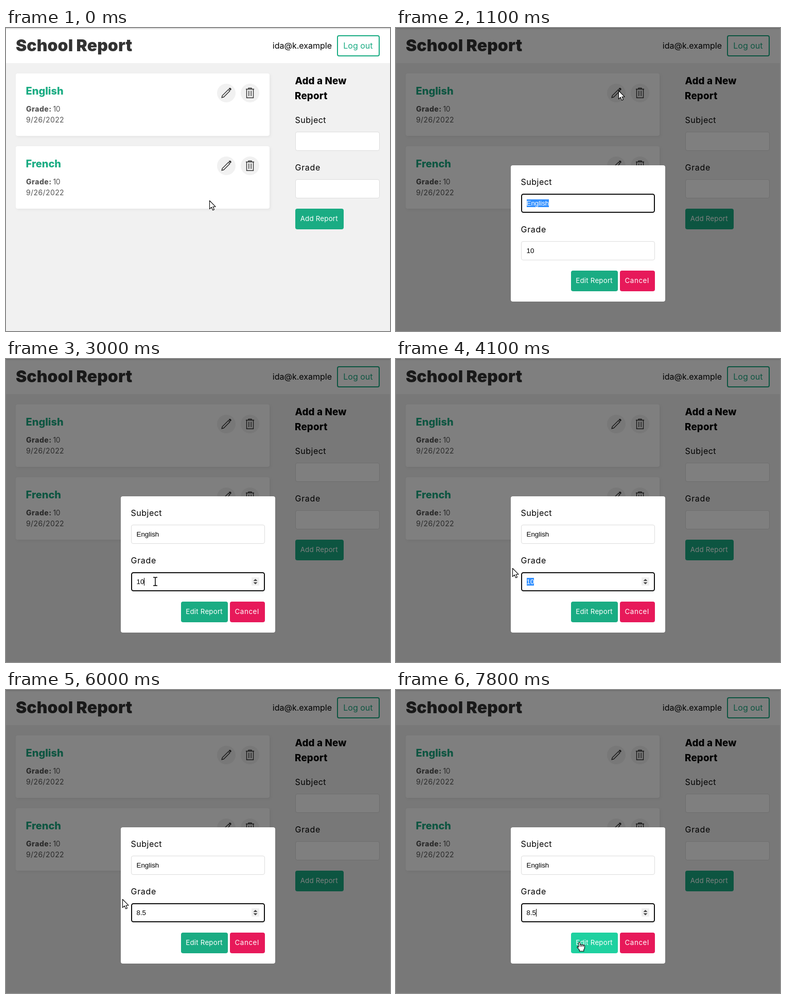
An HTML page for the animation above (8000 ms loop, 746 by 587 pixels).

```html
<!DOCTYPE html>
<html lang="en">
<head>
<meta charset="utf-8">
<title>School Report</title>
<style>
  html, body { margin: 0; width: 100%; height: 100%; overflow: hidden; background: #f1f1f1; }
  svg { display: block; }
  text { font: 16px Inter, "Open Sans", sans-serif; fill: #000; white-space: pre; }
  .h1 { font-size: 32px; font-weight: 900; fill: #333; letter-spacing: .05px; }
  .h3 { font-size: 18.72px; font-weight: 800; letter-spacing: .2px; }
  .h4 { font-size: 20px; font-weight: 800; fill: #1aac83; }
  .meta { font-size: 14px; fill: #555; letter-spacing: .4px; }
  .strong { font-weight: 800; letter-spacing: .5px; }
  .tight { letter-spacing: -.4px; }
  .label { letter-spacing: .5px; }
  .wide { letter-spacing: .7px; }
  .link { fill: #1aac83; }
  .btn { font-size: 13.33px; fill: #fff; letter-spacing: .2px; }
  .loose { letter-spacing: .6px; }
  .value { font: 13.33px "Liberation Sans", Arial, sans-serif; }
  .card { fill: #fff; filter: drop-shadow(2px 2px 2.5px rgba(0, 0, 0, .05)); }
  .disc { fill: #f1f1f1; }
  .disc.hover { fill: #b4b2b2; }
  .field { fill: #fff; stroke: #ddd; }
  .field.focus { stroke: #101010; stroke-width: 2px; }
  .green { fill: #1aac83; }
  .green.hover { fill: #1fd1a0; }
  .red { fill: #e7195a; }
  .mark { fill: #3390ff; }
  .line { fill: none; stroke: #333; stroke-width: 1.4px; }
  .pointer { fill: #fff; stroke: #000; stroke-width: 1.1px; stroke-linejoin: round; }
</style>
</head>
<body>
<svg width="746" height="587" viewBox="0 0 746 587">
  <defs>
    <linearGradient id="edge" x2="0" y2="1">
      <stop stop-color="#cfcfcf"/><stop offset="1" stop-color="#fff"/>
    </linearGradient>
    <g id="pencil">
      <path class="line" d="M-8.8 8.8 -7.8 5 4-6.8 6.8-4-5 7.8Z"/>
      <path fill="#333" d="M4.6-8.4 6-9.8Q7-10.6 8-9.8L9.4-8.4Q10.2-7.4 9.4-6.4L8-5Z"/>
    </g>
    <g id="bin" class="line">
      <path d="M-8-7.5H8M-3-8V-9.5H3V-8M-6.5-7.5V9.3H6.5V-7.5M-2.2-4.5V6M2.2-4.5V6"/>
    </g>
    <g id="card">
      <rect class="card" x="19" y="88" width="493" height="121" rx="4"/>
      <text class="meta strong" x="39" y="162">Grade:</text>
      <text class="meta tight" x="91.5" y="162">10</text>
      <text class="meta" x="39" y="183">9/26/2022</text>
      <circle class="disc" cx="474" cy="126" r="18"/>
      <use href="#bin" x="474" y="126"/>
    </g>
    <path id="ibeam" d="M-4-8H-1.5Q0-8 0-6.5 0-8 1.5-8H4M0-7V7M-4 8H-1.5Q0 8 0 6.5 0 8 1.5 8H4"/>
  </defs>

  <rect width="746" height="587" fill="#f1f1f1"/>
  <rect width="746" height="68" fill="#fff"/>
  <rect width="746" height="3" fill="url(#edge)"/>
  <text class="h1" x="19" y="45">School Report</text>
  <text x="633" y="40" text-anchor="end">ida@k.example</text>
  <rect x="644" y="15" width="81" height="39" rx="3" fill="#fff" stroke="#1aac83" stroke-width="2"/>
  <text class="link" x="655.3" y="40">Log out</text>

  <use href="#card"/>
  <text class="h4" x="38.5" y="129">English</text>
  <circle class="disc edit" cx="428" cy="126" r="18"/>
  <use href="#pencil" x="428" y="126"/>

  <use href="#card" y="141"/>
  <text class="h4" x="38.5" y="270">French</text>
  <circle class="disc edit" cx="428" cy="267" r="18"/>
  <use href="#pencil" x="428" y="267"/>

  <text class="h3" x="561.5" y="109">Add a New</text>
  <text class="h3" x="561" y="138">Report</text>
  <text class="label" x="561.5" y="184">Subject</text>
  <rect class="field" x="562.5" y="201.5" width="163" height="36" rx="3.5"/>
  <text class="wide" x="561.5" y="276">Grade</text>
  <rect class="field" x="562.5" y="293.5" width="163" height="36" rx="3.5"/>
  <rect class="green" x="562" y="350" width="94" height="40" rx="4"/>
  <text class="btn" x="571.7" y="374">Add Report</text>

  <g id="modal">
    <rect width="746" height="587" opacity=".5"/>
    <rect x="223" y="266" width="300" height="264" rx="4" fill="#fff"/>
    <text class="label" x="242.5" y="304">Subject</text>
    <rect id="subject" class="field" rx="3.5"/>
    <rect id="subjectMark" class="mark" x="254" y="332" width="43" height="15"/>
    <text id="subjectText" class="value" x="253.5" y="344">English</text>
    <text class="wide" x="242.5" y="396">Grade</text>
    <rect id="grade" class="field" rx="3.5"/>
    <rect id="gradeMark" class="mark" y="424" height="15"/>
    <text class="value" x="253.5" y="436"><tspan id="plain"></tspan><tspan id="picked" fill="#fff"></tspan></text>
    <rect id="caret" y="424" width="1" height="15"/>
    <g id="spinner">
      <rect id="spinBack" x="477" y="423" width="15" height="16" fill="#efefef"/>
      <path fill="#444" d="M480.5 430 484.5 426 488.5 430ZM480.5 432.5H488.5L484.5 436.5Z"/>
    </g>
    <rect id="save" class="green" x="340" y="470" width="91" height="40" rx="4"/>
    <text class="btn" x="349.3" y="494">Edit Report</text>
    <rect class="red" x="435" y="470" width="68" height="40" rx="4"/>
    <text class="btn loose" x="444.5" y="494">Cancel</text>
  </g>

  <g id="cursor">
    <path id="arrow" class="pointer" d="M.5.5V16.6L4.2 13.2 6.7 18.9 9.5 17.7 7 12.2H12Z"/>
    <g id="hand" class="pointer">
      <path d="M-1.5 9.5V1.2a1.5 1.5 0 0 1 3 0V5.4a1.5 1.5 0 0 1 3 .3 1.5 1.5 0 0 1 3 .4 1.4 1.4 0 0 1 2.8.8V11.5L8.8 14V17H.3V14.5L-3.8 9.8Q-4.2 7.8-2.4 8Z"/>
      <path d="M1.5 5V8.5M4.5 5.6V8.5M7.5 6V8.5" fill="none"/>
    </g>
    <g id="beam" fill="none">
      <use href="#ibeam" stroke="#fff" stroke-width="3"/>
      <use href="#ibeam" stroke="#000" stroke-width="1.5"/>
    </g>
  </g>
</svg>

<script>
  const LOOP = 8000, STEP = 100;
  const $ = id => document.getElementById(id);
  const edits = [...document.querySelectorAll('.edit')];

  // Pointer moves: start time, then one point per step.
  const moves = [
    [0, [[395, 334]]],
    [200, [[399, 318], [411, 272], [426, 218], [437, 170], [442, 141], [437, 126], [432, 121]]],
    [1500, [[428, 132], [413, 165], [390, 212], [363, 268], [336, 325], [314, 374], [300, 408], [292, 426], [290, 431]]],
    [3500, [[283, 434], [272, 438], [259, 440], [247, 437], [236, 425], [228, 411], [226, 405]]],
    [6100, [[232, 412], [250, 425], [272, 440], [296, 456], [320, 471], [340, 482], [352, 487], [356, 489]]]
  ];
  const typed = [[0, '10'], [5100, '8'], [5300, '8.'], [5400, '8.5']];

  const latest = (list, t) => list.filter(item => item[0] <= t).pop();
  const show = (id, on) => $(id).setAttribute('visibility', on ? 'inherit' : 'hidden');
  const flag = (el, name, on) => el.classList.toggle(name, on);

  function pointerAt(t) {
    const [start, points] = latest(moves, t);
    return points[Math.min(points.length - 1, Math.floor((t - start) / STEP))];
  }

  function inside(el, x, y) {
    const n = name => +el.getAttribute(name);
    return x >= n('x') && x <= n('x') + n('width') && y >= n('y') && y <= n('y') + n('height');
  }

  function focusField(el, on, y) {
    flag(el, 'focus', on);
    const inset = on ? 1 : .5;
    const box = { x: 243 + inset, y: y + inset, width: 260 - 2 * inset, height: 37 - 2 * inset };
    for (const key in box) el.setAttribute(key, box[key]);
  }

  function caretShown(t) {
    if (t < 3000) return false;
    if (t < 5100) return t < 3500;
    return t < 6000 || Math.floor((t - 6000) / 600) % 2 === 1;
  }

  function draw(now) {
    const t = Math.floor(now % LOOP / STEP) * STEP;
    const open = t >= 1100;
    const onGrade = t >= 3000;
    const dragging = t >= 3500 && t < 4000;
    const [x, y] = pointerAt(t);

    // Page and dialog state
    show('modal', open);
    focusField($('subject'), !onGrade, 321);
    focusField($('grade'), onGrade, 413);
    show('subjectMark', open && !onGrade);
    $('subjectText').style.fill = onGrade ? '#000' : '#fff';

    // Grade value, selection and caret
    const value = latest(typed, t)[1];
    const selecting = t >= 3500 && t < 5100;
    const count = selecting ? Math.min(2, Math.max(0, Math.round((268.5 - x) / 7.4))) : 0;
    const split = value.length - count;
    $('plain').textContent = value.slice(0, split);
    $('picked').textContent = value.slice(split);
    $('gradeMark').setAttribute('x', 254 + 7 * split);
    $('gradeMark').setAttribute('width', 7 * count);
    const width = [...value].reduce((sum, c) => sum + (c === '.' ? 3.7 : 7.4), 0);
    $('caret').setAttribute('x', Math.floor(253.6 + width));
    show('caret', open && caretShown(t));

    // Hover effects
    const onField = open && (inside($('grade'), x, y) || inside($('subject'), x, y));
    const onSave = open && inside($('save'), x, y);
    let onEdit = false;
    for (const disc of edits) {
      const hit = !open && Math.hypot(x - 428, y - disc.getAttribute('cy')) <= 18;
      flag(disc, 'hover', hit);
      onEdit = onEdit || hit;
    }
    flag($('save'), 'hover', onSave);
    show('spinner', open && (onGrade || inside($('grade'), x, y)));
    show('spinBack', open && onGrade);

    // Pointer
    const beam = onField || dragging;
    const hand = onEdit || onSave;
    show('beam', beam);
    show('hand', hand && !beam);
    show('arrow', !beam && !hand);
    $('cursor').setAttribute('transform', `translate(${x} ${y})`);
  }

  function tick() {
    draw(performance.now());
    requestAnimationFrame(tick);
  }
  tick();
</script>
</body>
</html>
```
